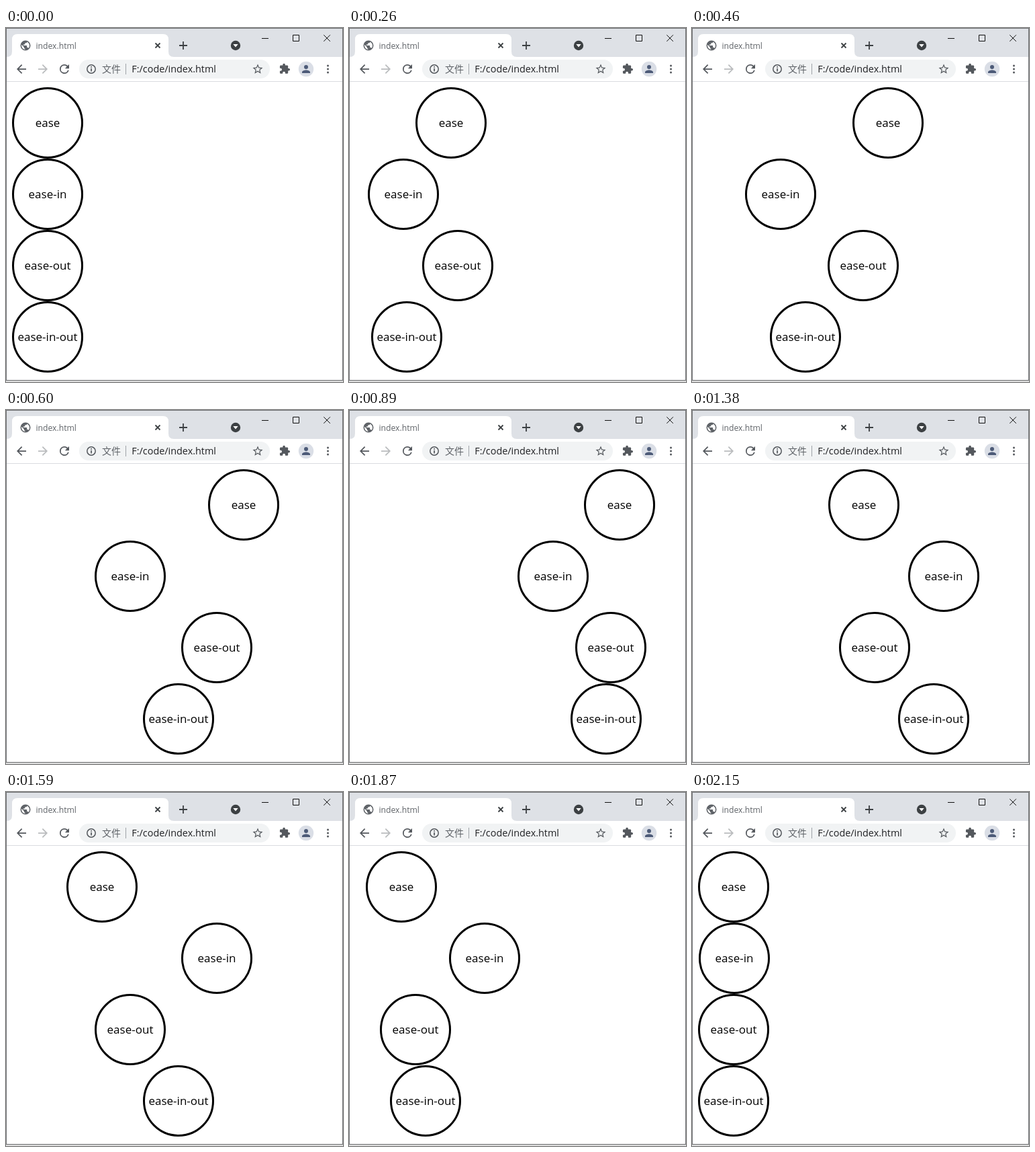
Animation of 502 by 526 pixels, one loop 2.22 s. Source, as an HTML page:

```html
<!DOCTYPE html>
<html lang="en">
<head>
<meta charset="utf-8">
<title>index.html</title>
<style>
  html, body { margin: 0; width: 100%; height: 100%; overflow: hidden; background: #fff; }
  svg { display: block; width: 502px; height: 526px; }
  text { font-family: "Open Sans", "Noto Sans", sans-serif; }
  .cjk { font-family: "Noto Sans CJK SC", "Noto Sans CJK", sans-serif; }
  .line { fill: none; stroke-width: 1; stroke: #111; }
  .balls text { font-size: 17px; text-anchor: middle; }
  .balls circle { fill: #fff; stroke: #000; stroke-width: 3; }
</style>
</head>
<body>
<svg viewBox="0 0 502 526">
  <defs>
    <path id="arrow" d="M20 11H7.83l5.59-5.59L12 4l-8 8 8 8 1.41-1.41L7.83 13H20z"/>
  </defs>
  <rect width="502" height="526" fill="#fff"/>

  <!-- tab strip -->
  <rect width="502" height="43" fill="#dee1e6"/>
  <path d="M1 43q8 0 8-8V17q0-8 8-8h217q8 0 8 8v18q0 8 8 8z" fill="#fff"/>
  <g fill="#5f6368">
    <path transform="translate(20 17) scale(.75)" d="M12 2a10 10 0 1 0 0 20 10 10 0 0 0 0-20zm-1 17.93A8 8 0 0 1 4.21 10.21L9 15v1a2 2 0 0 0 2 2zm6.9-2.54A2 2 0 0 0 16 16h-1v-3a1 1 0 0 0-1-1H8v-2h2a1 1 0 0 0 1-1V7h2a2 2 0 0 0 2-2v-.41a8 8 0 0 1 2.9 12.8z"/>
    <text x="44.5" y="31" font-size="12.2">index.html</text>
  </g>
  <path d="M222.5 22.5l7 7m0-7l-7 7M258 26h12m-6-6v12" fill="none" stroke="#3c4043" stroke-width="1.8"/>
  <circle cx="342" cy="26" r="7.2" fill="#3c4043"/>
  <path d="M338.3 24h7.4l-3.7 4.6z" fill="#fff"/>
  <path class="line" d="M381 15.5h10M427.5 10.5h9v9h-9zM473.3 10.3l9.6 9.6m0-9.6l-9.6 9.6"/>

  <!-- toolbar -->
  <rect x="109" y="47" width="284" height="28" rx="14" fill="#f1f3f4"/>
  <g fill="#54585d">
    <use href="#arrow" transform="translate(12.5 50.5) scale(.875)"/>
    <use href="#arrow" transform="translate(65.5 50.5) scale(-.875 .875)" fill="#babcbe"/>
    <path transform="translate(76.5 50.5) scale(.875)" d="M17.65 6.35A7.95 7.95 0 0 0 12 4a8 8 0 1 0 7.73 10h-2.08A6 6 0 1 1 12 6c1.66 0 3.14.69 4.22 1.78L13 11h7V4z"/>
    <path d="M126.2 60h1.7v4.4h-1.7zm0-3h1.7v1.7h-1.7z"/>
    <circle cx="127" cy="61" r="6.2" fill="none" stroke="#54585d" stroke-width="1.5"/>
    <path transform="translate(366 52) scale(.75)" d="M22 9.24l-7.19-.62L12 2 9.19 8.63 2 9.24l5.46 4.73L5.82 21 12 17.27 18.18 21l-1.63-7.03zM12 15.4l-3.76 2.27 1-4.28-3.32-2.88 4.38-.38L12 6.1l1.71 4.04 4.38.38-3.32 2.88 1 4.28z"/>
    <path transform="translate(406.5 52) scale(.72)" d="M20.5 11H19V7c0-1.1-.9-2-2-2h-4V3.5a2.5 2.5 0 0 0-5 0V5H4c-1.1 0-2 .9-2 2v3.8h1.5a2.7 2.7 0 0 1 0 5.4H2V20c0 1.1.9 2 2 2h3.8v-1.5a2.7 2.7 0 0 1 5.4 0V22H17c1.1 0 2-.9 2-2v-4h1.5a2.5 2.5 0 0 0 0-5z"/>
    <circle cx="479.5" cy="56" r="1.5"/><circle cx="479.5" cy="61" r="1.5"/><circle cx="479.5" cy="66" r="1.5"/>
  </g>
  <text class="cjk" x="143" y="66" font-size="14" fill="#5f6368">文件</text>
  <path d="M178.5 53v16" stroke="#9fa3a8"/>
  <text x="187.3" y="66" font-size="14.4" fill="#202124">F:/code/index.html</text>
  <circle cx="447" cy="61" r="11.2" fill="#dadee6"/>
  <path transform="translate(438 52) scale(.75)" fill="#4d5b78" d="M12 12a4 4 0 1 0 0-8 4 4 0 0 0 0 8zm0 2c-2.67 0-8 1.34-8 4v2h16v-2c0-2.66-5.33-4-8-4z"/>
  <path d="M0 79.5h502" stroke="#dadce0"/>

  <g class="balls"></g>

  <!-- window edge -->
  <rect y="524" width="502" height="2" fill="#dcdcdc"/>
  <rect class="line" x=".5" y=".5" width="501" height="523" style="stroke:#6c6e70"/>
</svg>
<script>
const curves = {
  "ease": [.25, .1, .25, 1],
  "ease-in": [.42, 0, 1, 1],
  "ease-out": [0, 0, .58, 1],
  "ease-in-out": [.42, 0, .58, 1]
};
const LOOP = 2220, TRAVEL = 350;

// The screen refreshes in uneven steps: start times (ms) and ticks of 1/60 s.
const starts = [0, 60, 130, 200, 260, 320, 390, 460, 530, 600];
const ticks = [0, 1, 4, 7, 11, 15, 19, 23, 27, 32];
for (let k = 0; k < 22; k++) {
  starts.push(680 + 70 * k);
  ticks.push(Math.min(36 + 4 * k, 119.9));
}

const bezier = (a, b, s) => 3 * a * s * (1 - s) ** 2 + 3 * b * s * s * (1 - s) + s ** 3;

function ease([x1, y1, x2, y2], t) {
  if (t <= 0 || t >= 1) return t <= 0 ? 0 : 1;
  let lo = 0, hi = 1;
  for (let i = 0; i < 30; i++) {
    const mid = (lo + hi) / 2;
    if (bezier(x1, x2, mid) < t) lo = mid; else hi = mid;
  }
  return bezier(y1, y2, lo);
}

const holder = document.querySelector(".balls");
holder.innerHTML = Object.keys(curves).map((name, i) =>
  `<g><circle cx="62" cy="${141 + 106 * i}" r="51.5"/><text x="62" y="${147 + 106 * i}">${name}</text></g>`
).join("");
const balls = [...holder.children];
const shapes = Object.values(curves);

function draw(now) {
  const time = now % LOOP;
  const step = starts.findLastIndex(start => start <= time);
  const t = ticks[step] / 60;
  balls.forEach((ball, i) => {
    const part = t <= 1 ? ease(shapes[i], t) : 1 - ease(shapes[i], t - 1);
    ball.setAttribute("transform", `translate(${Math.round(TRAVEL * part)} 0)`);
  });
}

let origin;
function tick(now) {
  origin ??= now;
  draw(now - origin);
  requestAnimationFrame(tick);
}
draw(0);
requestAnimationFrame(tick);
</script>
</body>
</html>
```
